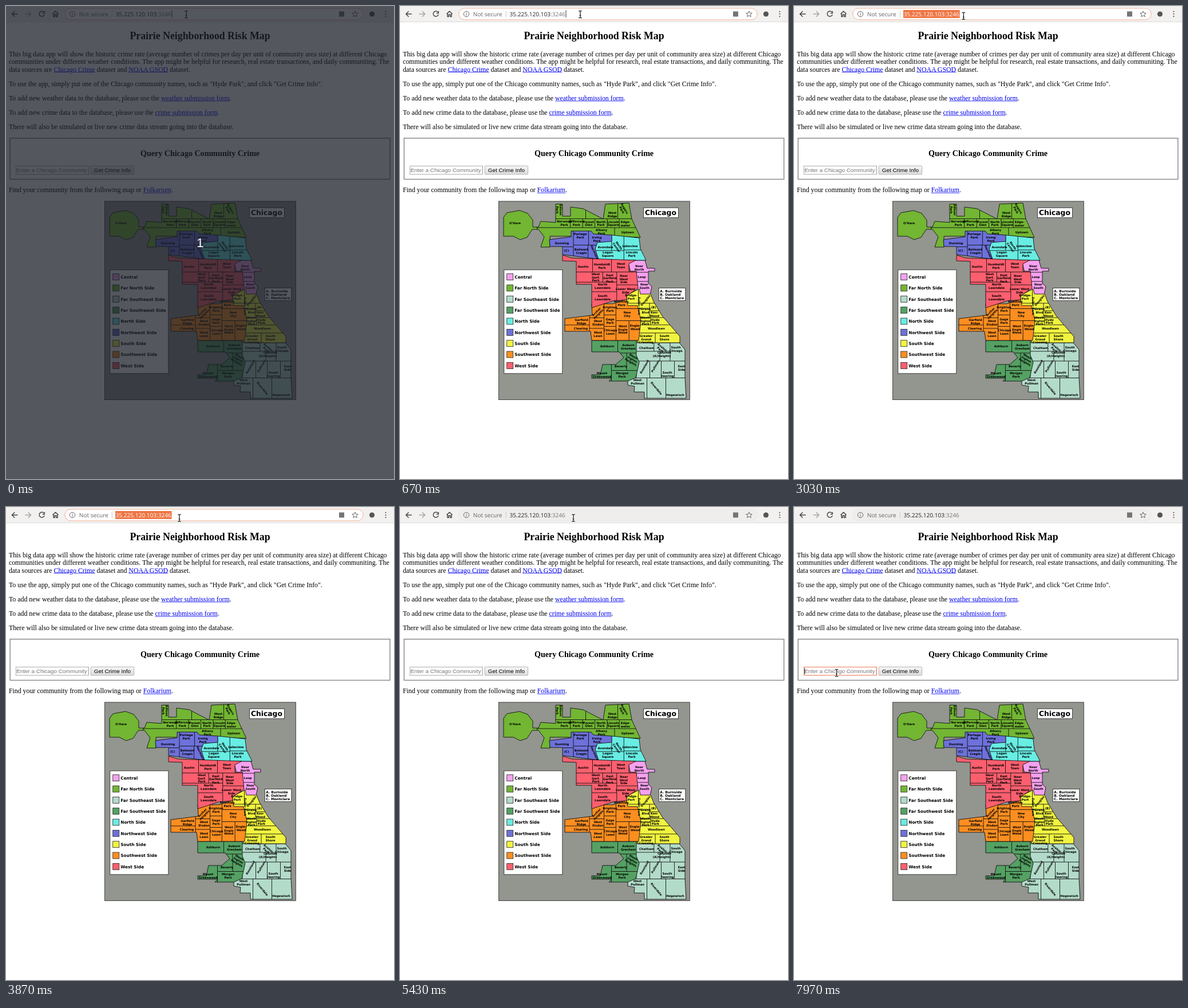
Write an HTML page that moves like this. It is 678 px wide and 826 px high and loops after 8 s.

```html
<!DOCTYPE html>
<html lang="en">
<head>
<meta charset="utf-8">
<title>Community map</title>
<style>
html, body { margin: 0; width: 678px; height: 826px; overflow: hidden; background: #fff; }
#page { position: absolute; left: -.7px; top: 27.5px; width: 903px; padding: 0 8px; white-space: nowrap;
  transform: scale(.74); transform-origin: 0 0; font: 16px/18px "Liberation Serif", serif; display: flow-root; }
h2 { font-size: 24px; line-height: 27px; margin: 19.9px 0; text-align: center; }
h3 { font-size: 19px; line-height: 21px; margin: 18.7px 0; text-align: center; }
p { margin: 16px 0; }
u { color: #00e; }
#query { margin: 0 2px; padding: 5.6px 12px 10px; border: 2px solid #8c8c8c; display: flow-root; }
#row { display: flex; gap: 4px; font: 13.33px/19px "Liberation Sans", sans-serif; }
#field { width: 169px; padding: 0 1px; border: 1px solid #999; outline: 1px solid #ccc; outline-offset: -2px; color: #757575; position: relative; }
#field.on { border-color: #e8693c; outline-color: #f0a58a; }
#field i { position: absolute; left: 1px; top: 2px; width: 1px; height: 15px; background: #000; display: none; }
#field.on i { display: block; }
#button { width: 101px; border: 1px solid #999; border-radius: 2px; background: linear-gradient(#f6f6f6, #dcdcdc); text-align: center; }
svg { position: absolute; left: 0; top: 0; }
#map { font: bold 5.2px "DejaVu Sans", sans-serif; text-rendering: geometricPrecision; }
.bar { font: 10.1px "Open Sans", sans-serif; text-rendering: geometricPrecision; }
</style>
</head>
<body>
<div id="page">
  <h2>Prairie Neighborhood Risk Map</h2>
  <p>This big data app will show the historic crime rate (average number of crimes per day per unit of community area size) at different Chicago<br>communities under different weather conditions. The app might be helpful for research, real estate transactions, and daily communiting. The<br>data sources are <u>Chicago Crime</u> dataset and <u>NOAA GSOD</u> dataset.</p>
  <p>To use the app, simply put one of the Chicago community names, such as "Hyde Park", and click "Get Crime Info".</p>
  <p>To add new weather data to the database, please use the <u>weather submission form</u>.</p>
  <p>To add new crime data to the database, please use the <u>crime submission form</u>.</p>
  <p>There will also be simulated or live new crime data stream going into the database.</p>
  <div id="query">
    <h3>Query Chicago Community Crime</h3>
    <div id="row"><div id="field"><i></i>Enter a Chicago Community</div><div id="button">Get Crime Info</div></div>
  </div>
  <p>Find your community from the following map or <u>Folkarium</u>.</p>
</div>

<svg width="678" height="826" viewBox="0 0 678 826">
  <defs><path id="ibar" d="M-2.8-6H-1Q0-6 0-5 0-6 1-6H2.8M0-5V5M-2.8 6H-1Q0 6 0 5 0 6 1 6H2.8M-1.3 2H1.3"/></defs>
  <g id="map"></g>
  <g class="bar">
    <path fill="#f2f1f0" d="M0 0H678V27.5H0z"/>
    <path stroke="#d4d2d0" stroke-width=".8" d="M0 27.7H678"/>
    <rect id="pill" x="102.8" y="4" width="521.4" height="20" rx="10"/>
    <g fill="none" stroke="#484848" stroke-width="1.5">
      <path d="M20.5 14H10.8M15.2 9.2L10.4 14l4.8 4.8"/>
      <path stroke="#a5a5a5" d="M33.5 14H43.2M38.8 9.2L43.6 14l-4.8 4.8"/>
      <path id="reload" d="M66.2 10.6A4.6 4.6 0 1 0 67.1 15M67.3 9V12.6H63.7"/>
      <path id="stop" d="M59 10.2l7.6 7.6M66.6 10.2l-7.6 7.6"/>
      <path d="M81.5 13.8L86.5 9.3l5 4.5M83 13V18.4H85.2V15H87.8V18.4H90V13"/>
      <g stroke="#666" stroke-width="1">
        <circle cx="116" cy="14" r="4.7"/>
        <path d="M116 13.3V16.8M116 11.2V12.3"/>
        <path d="M610 8.9l1.5 3.4 3.7.3-2.8 2.4.9 3.6-3.3-1.9-3.3 1.9.9-3.6-2.8-2.4 3.7-.3z"/>
      </g>
      <path stroke="#c8c8c8" stroke-width="1" d="M185.3 8.5V19.5"/>
    </g>
    <rect x="582" y="9.5" width="9" height="9" fill="#757575"/>
    <circle cx="639.5" cy="14" r="4.6" fill="#555"/>
    <path d="M663.5 9.8h0m0 4.2h0m0 4.2h0" stroke="#484848" stroke-width="2.1" stroke-linecap="round"/>
    <text x="127.8" y="17.7" fill="#666">Not secure</text>
    <rect id="select" x="191" y="7" width="98.6" height="14" fill="#ee7543"/>
    <text id="url" x="191.5" y="17.7">35.225.120.103<tspan id="port">:3246</tspan></text>
    <path id="caret" stroke="#222" stroke-width=".9" d="M290 7.5V20"/>
  </g>
  <path id="arrow" fill="#fff" stroke="#222" stroke-width="1.1" stroke-linejoin="round" d="M.4.4V12.4L3.1 9.9 5.1 14.2 7.1 13.3 5.2 9.1H8.9z"/>
  <g id="beam" fill="none">
    <use href="#ibar" stroke="#fff" stroke-width="2.8"/>
    <use href="#ibar" stroke="#222" stroke-width="1.3"/>
  </g>
  <g id="count">
    <path fill="#1b1f29" fill-opacity=".75" d="M0 0H678V826H0z"/>
    <text x="339" y="421" fill="#fff" text-anchor="middle" font-size="22" font-family="Liberation Sans, sans-serif">1</text>
  </g>
</svg>

<script>
const $ = id => document.getElementById(id);

// Sides of the city: name, colour, outline (later sides cover earlier ones), rows of communities.
// A row spreads its names evenly from its first point to its second; "@" gives a turn in degrees.
const sides = [
  ['Central', '#f6a1ef', 'M398 444H428L432 458H445V463H434V484L440 490 437 504H412z',
    ['418,457 427,489 Near/North|Loop|Near/South']],
  ['Far North Side', '#72b633',
    'M181 369L187 361 209 357 223 362 232 374V386H242L246 376 272 378V346H284V367H298V351L320 354 355 372 359 346 400 344 405 372 420 404 370 402H262V421H246L252 403 242 390H231L222 404 210 408 198 402H181z',
    ["201,379 278,356 O'Hare|Edison/Park@90", '371,364 390,355 West/Ridge|Rogers/Park@60',
      '287,379 394,380 Norwood/Park|Jefferson/Park|Forest/Glen|North/Park|Lincoln/Square|Edge-/water',
      '352,394 398,395 Albany/Park|Uptown']],
  ['Far Southeast Side', '#b3dbca', 'M412 588H488L498 600V648L500 685H427V674H409L410 664 398 662V650L413 648z',
    ['431,597 482,599 Chatham|Avalon/Park@40|South/Chicago', '446,611 462,608 (A)|Calumet/Heights',
      '427,630 446,629 Roseland@-60|Pullman@-60', '467,643 492,632 South/Deering|East/Side',
      '415,656 481,679 West/Pullman|Riverdale@50|Hegewisch']],
  ['Far Southwest Side', '#54a163',
    'M335 584H413V610L418 622 412 649 398 655H365L370 650H335V644H350L354 626H377L391 614 383 604H335z',
    ['362,594 399,595 Ashburn|Auburn/Gresham', '406,617 386,629 Wash-/ington/Heights@30|Beverly',
      '353,644 388,644 Mount/Greenwood|Morgan/Park']],
  ['North Side', '#68ede3', 'M341 413L370 400 418 405 420 424 430 444H341z',
    ['359,421 402,419 Avondale|North/Center@55|Lakeview', '363,433 405,433 Logan/Square|Lincoln/Park']],
  ['Northwest Side', '#6d71d9',
    'M261 408L299 403V393H334L338 398 370 400V411L345 413 341 424 347 442 284 434V420H262z',
    ['283,414 291,427 Dunning|(C)', '315,401 344,407 Portage/Park|Irving/Park',
      '317,428 340,430 Belmont/Cragin|Hermosa@65']],
  ['South Side', '#f1f43f', 'M396 505L418 494 420 503H438L443 516 458 541 489 577V588H416L396 524z',
    ['404,508 418,524 Bridge-/Port|Fuller Park@90', '429,514 429,550 Douglas@-50|Grand/Blvd|Wash-/ington/Park',
      '443,526 448,563 (B)|Ken-/Wood|Hyde/Park|Woodlawn', '430,582 462,579 Greater/Grand/Crossing|South/Shore']],
  ['Southwest Side', '#fd8e20', 'M335 520H372L396 512 398 523H415L421 549 417 584H335L333 568H288V546L336 540z',
    ['387,519 397,538 Mckinley/Park|New/City', '345,536 367,529 Archer/Heights@-45|Brighton/Park',
      '317,551 316,563 Garfield/Ridge|Clearing', '346,553 367,550 West/Elsdon|Gage/Park',
      '346,573 411,561 West/Lawn|Chicago/Lawn|West/Engle/Wood|Engle-/Wood']],
  ['West Side', '#fd5f6f',
    'M284 435L300 440 412 444 400 450V463H413L416 493 396 506V513L372 515 335 527V486H308V446L284 445z',
    ['320,455 386,453 Austin|Humboldt/Park|West/Town', '342,474 391,477 West/Garf./Park|East/Garfield/Park|Near/West/Side',
      '354,489 394,497 North/Lawndale|Lower West/Side', '354,509 354,509 South/Lawndale']]
];

const mix = (a, b, k) => a + (b - a) * k;
const text = (s, x, y, extra = '') => `<text x="${x}" y="${y}" ${extra}>${s}</text>`;
const box = (x, y, w, h, fill = '#fff') =>
  `<rect x="${x}" y="${y}" width="${w}" height="${h}" fill="${fill}" stroke="#222" stroke-width=".8"/>`;

function places(row) {
  const [from, to, ...rest] = row.split(' ');
  const [x0, y0] = from.split(',').map(Number), [x1, y1] = to.split(',').map(Number);
  return rest.join(' ').split('|').map((entry, i, all) => {
    const [name, turn = 0] = entry.split('@'), k = i / Math.max(1, all.length - 1);
    return { x: mix(x0, x1, k), y: mix(y0, y1, k), lines: name.split('/'), turn };
  });
}

const label = ({ x, y, lines, turn }) =>
  `<g transform="translate(${x} ${y}) rotate(${turn})" text-anchor="middle">` +
  lines.map((s, i) => text(s, 0, 1.9 + (i - (lines.length - 1) / 2) * 5.5)).join('') + '</g>';

// Street-grid borders: cut the area at the widest gap between places until each stands alone.
function borders(list, x0, y0, x1, y1) {
  if (list.length < 2) return '';
  let best = { gap: -1 };
  for (const axis of ['x', 'y']) {
    const sorted = [...list].sort((a, b) => a[axis] - b[axis]);
    for (let i = 1; i < sorted.length; i++) {
      const a = sorted[i - 1][axis], b = sorted[i][axis];
      const gap = (b - a) * (axis === 'y' ? 1.6 : 1);
      if (gap > best.gap) best = { gap, axis, at: (a + b) / 2, low: sorted.slice(0, i), high: sorted.slice(i) };
    }
  }
  const { axis, at, low, high } = best;
  return axis === 'x'
    ? `M${at} ${y0}V${y1}` + borders(low, x0, y0, at, y1) + borders(high, at, y0, x1, y1)
    : `M${x0} ${at}H${x1}` + borders(low, x0, y0, x1, at) + borders(high, x0, at, x1, y1);
}

function side([, color, edge, rows], i) {
  return `<clipPath id="side${i}"><path d="${edge}"/></clipPath><path fill="${color}" d="${edge}"/>` +
    `<path fill="none" clip-path="url(#side${i})" d="${borders(rows.flatMap(places), 173, 341, 506, 687)}"/>`;
}

$('map').innerHTML = box(172.5, 341, 333.8, 346.4, '#93958f') +
  '<g stroke="#111" stroke-width=".9" stroke-linejoin="round">' + sides.map(side).join('') + '</g>' +
  sides.flatMap(s => s[3].flatMap(places)).map(label).join('') +
  box(181.8, 460.8, 102, 181) +
  sides.map(([name, color], i) => box(186.7, 467.6 + i * 19.35, 11, 11, color) +
    text(name, 200.3, 475.8 + i * 19.35, 'font-size="7.28"')).join('') +
  box(425.5, 352.3, 61, 17.4) + text('Chicago', 428, 365, 'font-size="12.3"') +
  box(452.3, 492.5, 46.5, 22) +
  ['A. Burnside', 'B. Oakland', 'C. Montclare'].map((s, i) => text(s, 454.3, 500 + i * 6, 'font-size="5.9"')).join('');

// Small pointer jumps near the address field: time, x, y
const jumps = [[0, 315, 14.7], [2430, 322.5, 22], [2670, 310, 17], [2800, 304, 15.7], [3030, 296.3, 17.3], [3730, 303, 19.2]];

function pointer(t) {
  const [, x, y] = jumps.findLast(j => j[0] <= t);
  // The long sweep to the form slows down and is seen in ten hard steps.
  const left = 1 - Math.min(10, Math.max(0, Math.floor((t - 6170) / 140) + 1)) / 10;
  return [mix(74.4, x, left ** 2.07), mix(289.6, y, left ** 1.5)];
}

const show = (id, on) => $(id).style.display = on ? '' : 'none';
const fill = (id, color) => $(id).setAttribute('fill', color);

function draw() {
  const t = performance.now() % 8000;
  const within = (a, b) => t >= a && t < b;
  const [x, y] = pointer(t);
  const shape = y > 20 && y < 280 ? 'arrow' : 'beam';
  for (const id of ['arrow', 'beam']) show(id, id === shape);
  $(shape).setAttribute('transform', `translate(${x} ${y})`);

  const focused = t < 4730, selected = within(2430, 4730), loading = within(4730, 5030);
  fill('pill', focused ? '#fff' : '#efeeed');
  $('pill').setAttribute('stroke', focused ? '#f3b297' : '#e9e8e7');
  show('select', selected);
  fill('url', selected ? '#fff' : '#222');
  fill('port', selected ? '#fff' : within(4730, 5430) ? '#222' : '#777');
  show('caret', t < 170 || within(670, 2430));
  show('reload', !loading);
  show('stop', loading);
  show('count', t < 170);
  $('field').className = t >= 7970 ? 'on' : '';
  requestAnimationFrame(draw);
}
draw();
</script>
</body>
</html>
```
